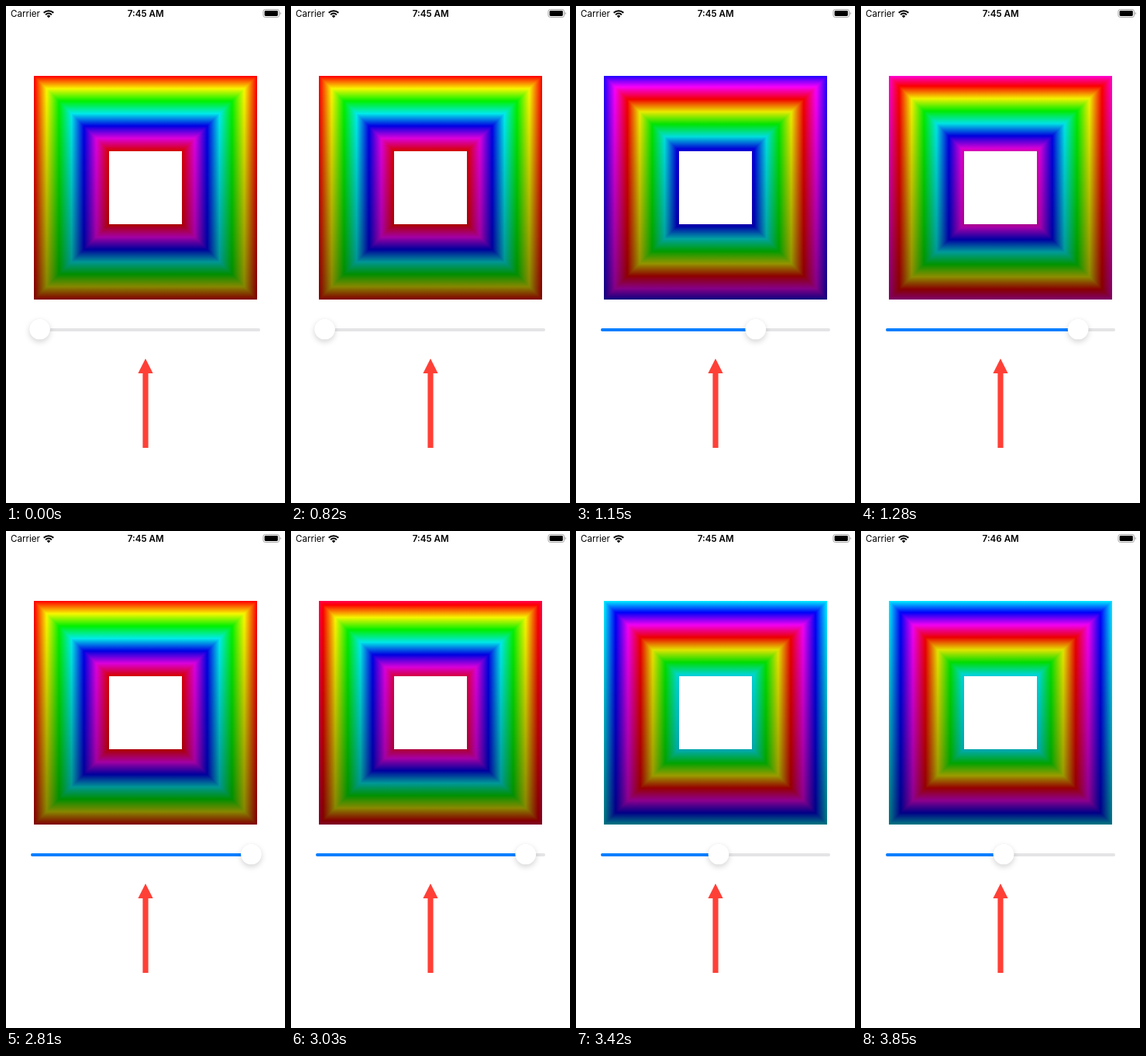
Write an HTML page that moves like this. It is 360x640 px and loops after 3950 ms.

```html
<!DOCTYPE html>
<html lang="en">
<head>
<meta charset="utf-8">
<title>Color cycling rectangle</title>
<style>
  html, body { margin: 0; width: 100%; height: 100%; overflow: hidden; background: #fff; }
  svg { display: block; width: 100vw; height: 100vh; }
  text { font-family: Inter, Roboto, sans-serif; font-size: 11.6px; fill: #000; }
  #clock { font-weight: 600; text-anchor: middle; }
  #thumb { filter: drop-shadow(0 0 .5px rgba(0, 0, 0, .12)) drop-shadow(0 3px 3.5px rgba(0, 0, 0, .16)); }
</style>
</head>
<body>
<svg viewBox="0 0 360 640">
  <defs>
    <linearGradient id="shade" x1="0" y1="0" x2="0" y2="1">
      <stop offset="0" stop-opacity="0"/>
      <stop offset="1" stop-opacity=".5"/>
    </linearGradient>
  </defs>

  <text x="6" y="14">Carrier</text>
  <g fill="none" stroke="#000" stroke-width="2">
    <path d="M48.7 8.7a9 9 0 0 1 12.6 0"/>
    <path d="M51.1 11.2a5.6 5.6 0 0 1 7.8 0"/>
  </g>
  <path d="M55 15.2l-2.2-2.3a3.2 3.2 0 0 1 4.4 0z"/>
  <text id="clock" x="180.2" y="14"></text>
  <rect x="331.9" y="4.5" width="20.6" height="10" rx="2.6" fill="none" stroke="#a6a6a6"/>
  <rect x="333.6" y="6.1" width="17.2" height="6.8" rx="1.3"/>
  <path d="M353.6 7.7q1.4.5 1.4 1.8t-1.4 1.8z" fill="#a6a6a6"/>

  <g id="rings"></g>
  <rect x="36" y="90" width="288" height="288" fill="url(#shade)"/>
  <rect x="133" y="187" width="94" height="94" fill="#fff"/>

  <rect x="32" y="415" width="296" height="3.9" rx="1.95" fill="#e4e4e6"/>
  <rect id="fill" x="32" y="415" height="3.9" rx="1.95" fill="#0a7fff"/>
  <circle id="thumb" cy="416.2" r="13.4" fill="#fff"/>

  <path d="M180 454l9.6 19h-6v96h-7.2v-96h-6z" fill="#ff4037"/>
</svg>
<script>
  const LOOP = 3950, RINGS = 100, SIZE = 288, STEP = SIZE / 300;
  const CLOCK_CHANGE = 3850;

  // Slider positions, held until the next time in ms.
  const drag = [
    [0, 0], [820, 0], [930, .2], [1030, .451], [1150, .69], [1280, .867],
    [2810, 1], [2920, .95], [3040, .85], [3160, .735], [3290, .627], [3420, .515]
  ];

  const get = id => document.getElementById(id);
  const set = (el, attrs) => {
    for (const key in attrs) el.setAttribute(key, attrs[key]);
    return el;
  };

  const rings = Array.from({ length: RINGS }, (_, i) => {
    const inset = i * STEP, side = SIZE - 2 * inset;
    const rect = document.createElementNS('http://www.w3.org/2000/svg', 'rect');
    return get('rings').appendChild(
      set(rect, { x: 36 + inset, y: 90 + inset, width: side, height: side }));
  });

  let shown = -1;

  function render(t) {
    get('clock').textContent = t < CLOCK_CHANGE ? '7:45 AM' : '7:46 AM';
    const value = drag.findLast(([start]) => start <= t)[1];
    if (value === shown) return;
    shown = value;
    const x = 43.5 + value * 273;
    set(get('thumb'), { cx: x });
    set(get('fill'), { width: x - 32 });
    rings.forEach((ring, i) => {
      const hue = (i / RINGS + value) % 1 * 360;
      set(ring, { fill: `hsl(${hue.toFixed(2)}, 100%, 50%)` });
    });
  }

  const begin = performance.now();
  function tick() {
    render((performance.now() - begin) % LOOP);
    requestAnimationFrame(tick);
  }
  tick();
</script>
</body>
</html>
```
